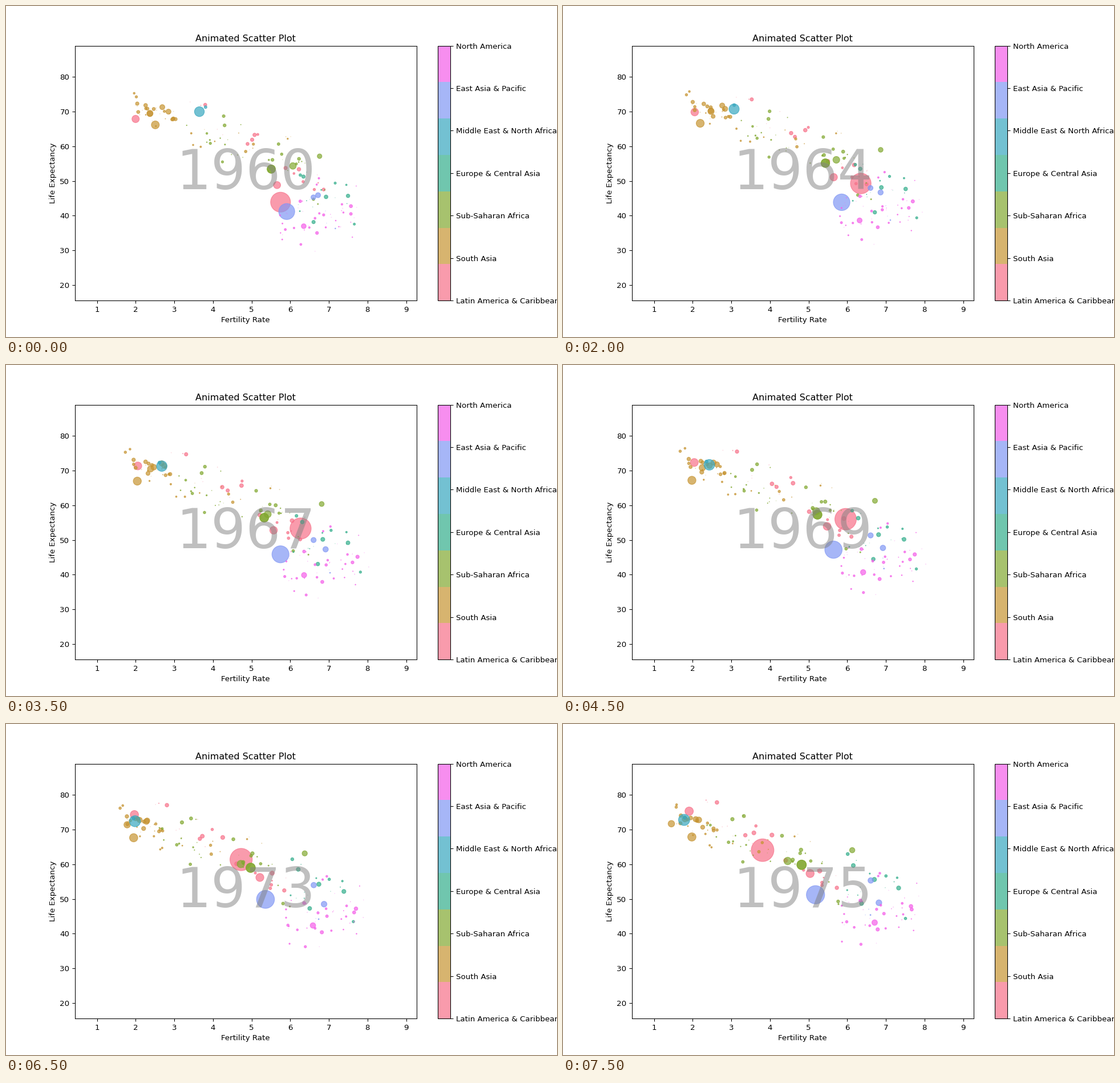
Write a matplotlib script that moves like this. It is 966 by 580 pixels and loops after 8 s.

```python
import numpy as np
import matplotlib.pyplot as plt
from matplotlib.animation import FuncAnimation
from matplotlib.cm import ScalarMappable
from matplotlib.colors import ListedColormap, Normalize

W, H, DPI = 966, 580, 96
YEARS, STEP_MS = 16, 500
ALPHA = 0.7

REGIONS = ["Latin America & Caribbean", "South Asia", "Sub-Saharan Africa",
           "Europe & Central Asia", "Middle East & North Africa",
           "East Asia & Pacific", "North America"]
COLORS = ["#f77189", "#c69432", "#82a831", "#34ae8c",
          "#38a7bf", "#8197f4", "#f55fe9"]
ROSE, OCHRE, OLIVE, TEAL, CYAN, BLUE, MAGENTA = range(7)

# Large bubbles: region, radius in px, fertility (start, end, bend),
# life expectancy (start, end).
LARGE = [
    (ROSE, 18, (5.75, 3.81, 1.43), (43.9, 64.0)),
    (ROSE, 7, (2.00, 1.91, 0.10), (67.8, 75.2)),
    (ROSE, 6.8, (5.66, 5.04, 0.20), (48.8, 57.3)),
    (OCHRE, 7.5, (2.51, 1.98, -0.22), (66.1, 67.8)),
    (OCHRE, 6, (2.37, 1.45, 0.45), (69.4, 71.6)),
    (OCHRE, 5.4, (2.37, 2.16, 0.20), (69.3, 72.7)),
    (OCHRE, 5, (2.69, 1.80, 0.40), (71.2, 72.9)),
    (OCHRE, 5, (2.85, 2.08, 0.25), (69.9, 72.9)),
    (OCHRE, 4, (2.97, 2.26, -0.32), (67.8, 70.6)),
    (OLIVE, 7.8, (5.51, 4.82, 0.14), (53.4, 59.8)),
    (OLIVE, 7.8, (5.51, 4.82, 0.14), (53.4, 59.8)),
    (OLIVE, 6.3, (6.07, 4.46, 0.10), (54.3, 60.9)),
    (OLIVE, 4.6, (6.76, 6.13, 0.35), (57.1, 64.0)),
    (CYAN, 9.2, (3.65, 1.78, -0.10), (69.9, 72.7)),
    (CYAN, 3, (3.81, 1.79, -0.25), (71.2, 73.4)),
    (BLUE, 14.6, (5.91, 5.18, 0.18), (41.2, 51.2)),
    (BLUE, 4.8, (6.60, 6.61, 0.00), (45.3, 55.3)),
    (BLUE, 5, (6.72, 6.82, 0.15), (45.9, 48.9)),
    (MAGENTA, 4.8, (6.35, 6.71, -0.16), (37.0, 43.2)),
]

# Small bubbles: region, count, fertility range, life expectancy at both
# ends of it, spread, drift, largest radius.
SWARMS = [
    (ROSE, 20, (3.4, 7.1), (71, 47), 3.5, (-1.2, 6), 4.2),
    (OCHRE, 28, (1.95, 3.15), (70.5, 69), 1.8, (-0.4, 2), 4.2),
    (OCHRE, 13, (3.2, 6.6), (64, 57), 2.5, (-1.0, 4.5), 3.2),
    (OLIVE, 32, (3.1, 7.0), (66, 50), 3.2, (-1.1, 6), 3.4),
    (TEAL, 17, (6.2, 7.7), (45, 47), 4.0, (-0.2, 9), 4.0),
    (BLUE, 3, (5.5, 7.4), (50, 33), 2.5, (-0.5, 8), 2.6),
    (MAGENTA, 44, (5.7, 7.8), (40, 41), 4.2, (0.1, 6.5), 3.4),
]

t = np.linspace(0, 1, YEARS)
rng = np.random.default_rng(12)


def path(start, end, bend=0.0):
    """Straight run from start to end, bowed by `bend` halfway."""
    return start + (end - start) * t + 4 * bend * t * (1 - t)


def swarm(region, count, xs, ys, spread, drift, r_max):
    for _ in range(count):
        u = rng.random()
        x = np.interp(u, (0, 1), xs)
        y = np.interp(u, (0, 1), ys) + rng.normal(0, spread)
        r = 0.6 + (r_max - 0.6) * rng.random() ** 2.2
        k = rng.uniform(0.7, 1.3)
        bend = rng.normal(0.08, 0.1)
        yield region, r, path(x, x + k * drift[0], bend), path(y, y + k * drift[1])


bubbles = [(g, r, path(*x), path(*y)) for g, r, x, y in LARGE]
for group in SWARMS:
    bubbles += swarm(*group)
# a bubble that appears in 1971 only and waits outside the axes otherwise
bubbles.append((OCHRE, 8, np.where(np.arange(YEARS) == 11, 2.30, -5),
                np.full(YEARS, 58.2)))
bubbles.sort(key=lambda b: b[0])

region, radius, X, Y = (np.array(column) for column in zip(*bubbles))
growth = np.where(region == OCHRE, 0.003, 0.009)


def sizes(year):
    r = radius * (1 + growth * year) - 0.6
    return (2 * np.maximum(r, 0.1) * 72 / DPI) ** 2


fig, ax = plt.subplots(figsize=(W / DPI, H / DPI), dpi=DPI)
cmap, norm = ListedColormap(COLORS), Normalize(0, 6)
dots = ax.scatter(X[:, 0], Y[:, 0], s=sizes(0), c=region, cmap=cmap, norm=norm,
                  alpha=ALPHA, linewidths=0.9)
label = ax.text(3.05, 47.7, "1960", fontsize=72, color="gray", alpha=0.5)
ax.set(title="Animated Scatter Plot", xlabel="Fertility Rate",
       ylabel="Life Expectancy", xlim=(0.428, 9.268), ylim=(15.62, 88.84))
bar = fig.colorbar(ScalarMappable(norm, cmap), ax=ax, alpha=ALPHA,
                   ticks=range(len(REGIONS)))
bar.ax.set_yticklabels(REGIONS)


def update(year):
    dots.set_offsets(np.column_stack([X[:, year], Y[:, year]]))
    dots.set_sizes(sizes(year))
    label.set_text(str(1960 + year))
    return dots, label


anim = FuncAnimation(fig, update, frames=YEARS, interval=STEP_MS,
                     repeat=True, repeat_delay=0)
plt.show()
```
